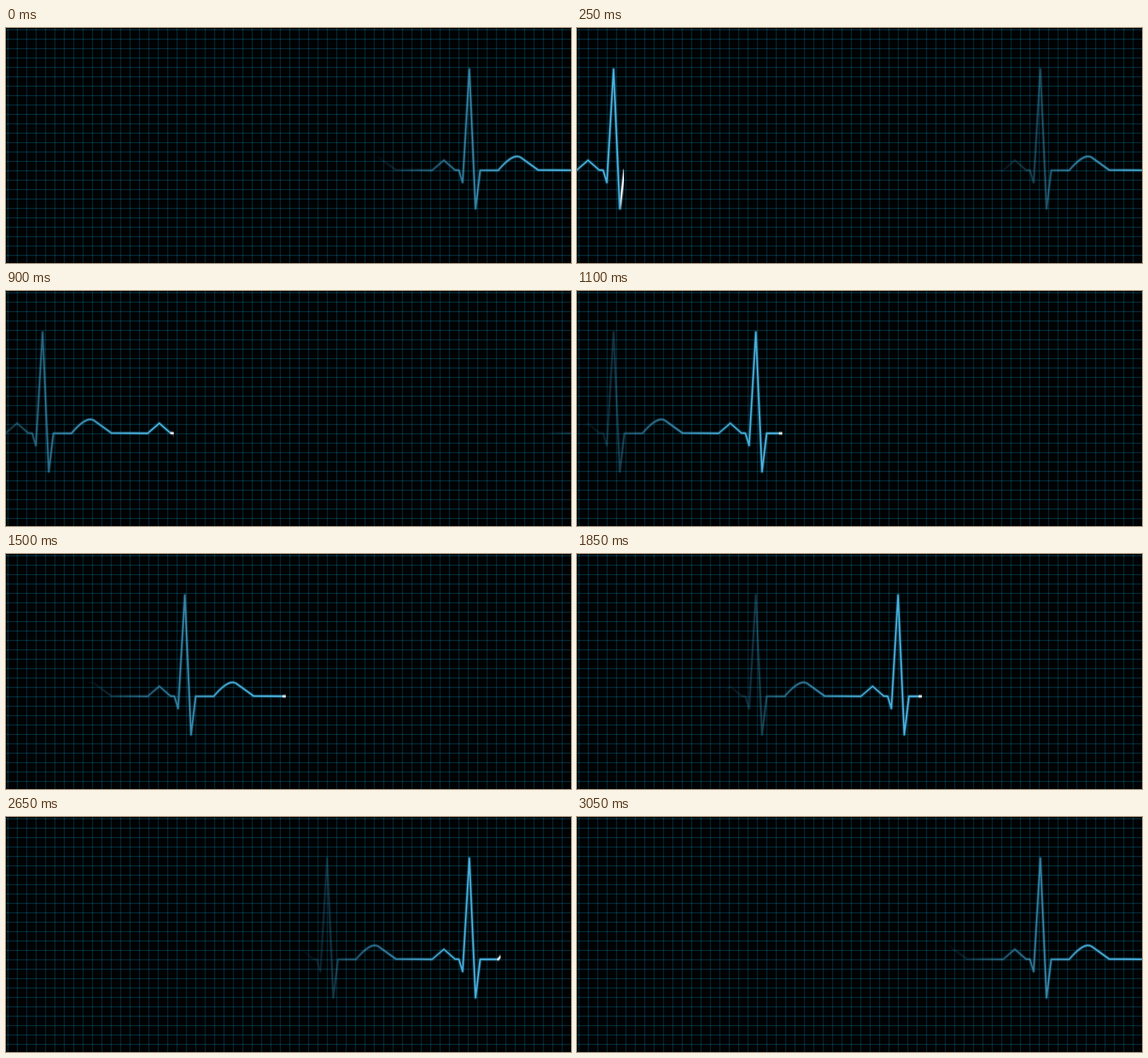
Write an HTML page with a canvas that moves like this. It is 842 px wide and 350 px high and loops after 3100 ms.

```html
<!DOCTYPE html>
<html lang="en">
<head>
<meta charset="utf-8">
<title>Heartbeat monitor</title>
<style>
html, body { margin: 0; width: 100%; height: 100%; overflow: hidden; background: #000; }
canvas { display: block; }
</style>
</head>
<body>
<canvas id="stage" width="842" height="350"></canvas>
<script>
const W = 842, H = 350;
const LOOP = 3100, STEP = 50, SPEED = 13.9;
const SPAN = 61 * SPEED;
const TAIL = 300, BEAT = 212, FIRST = -1;

const ctx = document.getElementById('stage').getContext('2d');

function layer() {
  const c = document.createElement('canvas');
  c.width = W;
  c.height = H;
  return c.getContext('2d');
}

function makeGrid() {
  const g = layer();
  g.fillStyle = '#000203';
  g.fillRect(0, 0, W, H);
  g.globalCompositeOperation = 'lighter';
  for (let x = 2; x < W; x += 14) {
    g.fillStyle = '#021f29';
    g.fillRect(x, 0, 1, H);
    g.fillStyle = '#02171f';
    g.fillRect(x + 1, 0, 1, H);
  }
  for (let y = 2; y < H; y += 14) {
    g.fillStyle = '#012c38';
    g.fillRect(0, y, W, 1);
    g.fillStyle = '#010f14';
    g.fillRect(0, y + 1, W, 1);
  }
  return g.canvas;
}

function addBeat(p, x) {
  const to = (dx, y) => p.lineTo(x + dx, y);
  to(0, 212);
  to(17.5, 197);
  to(34, 211.5);
  to(40, 212);
  to(45.5, 230);
  to(55.5, 61.5);
  to(64.7, 269);
  to(71.7, 212);
  to(98.5, 212);
  p.bezierCurveTo(x + 106, 203, x + 122, 186, x + 132, 192.8);
  to(158, 211.5);
}

function makeWave() {
  const g = layer();
  const path = new Path2D();
  path.moveTo(FIRST - 54, 211.5);
  for (let x = FIRST; x < W + BEAT; x += BEAT) addBeat(path, x);
  g.lineJoin = 'round';
  g.strokeStyle = 'rgba(45,130,170,0.16)';
  for (const w of [6.5, 5, 4]) {
    g.lineWidth = w;
    g.stroke(path);
  }
  g.strokeStyle = '#4bb2df';
  g.lineWidth = 2.3;
  g.stroke(path);
  return g.canvas;
}

const grid = makeGrid(), wave = makeWave(), trail = layer();

function drawTrail(head) {
  trail.globalCompositeOperation = 'copy';
  trail.drawImage(wave, 0, 0);

  trail.globalCompositeOperation = 'source-atop';
  trail.fillStyle = '#f4fbff';
  trail.fillRect(head - 5, 0, 5, H);

  const fade = trail.createLinearGradient(head - TAIL, 0, head, 0);
  for (let i = 0; i <= 12; i++) {
    const a = 1 - Math.pow(1 - i / 12, 1.8);
    fade.addColorStop(i / 12, `rgba(0,0,0,${a})`);
  }
  fade.addColorStop(1, 'rgba(0,0,0,0)');
  trail.globalCompositeOperation = 'destination-in';
  trail.fillStyle = fade;
  trail.fillRect(0, 0, W, H);
  ctx.drawImage(trail.canvas, 0, 0);
}

function draw(t) {
  const k = Math.floor((t % LOOP) / STEP);
  const head = Math.round(k * SPEED);
  ctx.drawImage(grid, 0, 0);
  if (head > 0) drawTrail(head);
  if (head < TAIL) drawTrail(head + Math.round(SPAN));
}

const start = performance.now();
function tick() {
  draw(performance.now() - start);
  requestAnimationFrame(tick);
}
tick();
</script>
</body>
</html>
```
